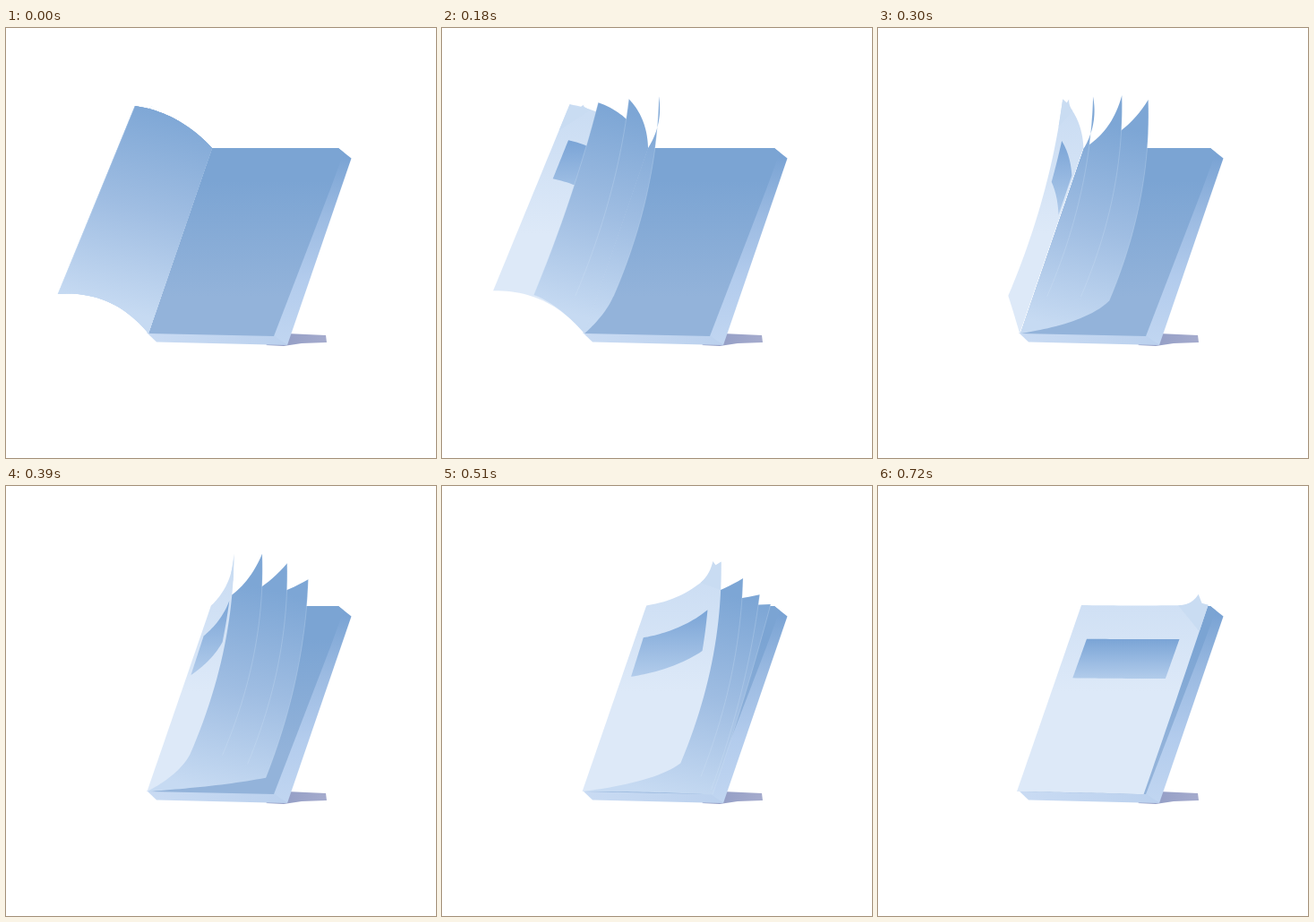
These frames come from a looping animation (480 px wide and 480 px high, 750 ms). An HTML page with a canvas:

```html
<!DOCTYPE html>
<html lang="en">
<head>
<meta charset="utf-8">
<title>Closing book</title>
<style>
html, body { margin: 0; width: 100%; height: 100%; overflow: hidden; background: #fff; }
canvas { display: block; width: 480px; height: 480px; }
</style>
</head>
<body>
<canvas id="stage" width="480" height="480"></canvas>
<script>
const ctx = document.getElementById('stage').getContext('2d');
const LOOP = 750, STEP = 30;
const TURN = 538, DELAY = 62, PAGES = 3;   // ms per sheet, ms between sheets

const clamp = (x, lo = 0, hi = 1) => Math.min(hi, Math.max(lo, x));
const mix = (a, b, t) => a + (b - a) * t;
const quad = (a, b, c, t) => mix(mix(a, b, t), mix(b, c, t), t);
const cubic = (a, b, c, d, t) => mix(quad(a, b, c, t), quad(b, c, d, t), t);
const smooth = (lo, hi, x) => {
  const t = clamp((x - lo) / (hi - lo));
  return t * t * (3 - 2 * t);
};

function gradient(x0, y0, x1, y1, ...colors) {
  const g = ctx.createLinearGradient(x0, y0, x1, y1);
  colors.forEach((c, i) => g.addColorStop(i / (colors.length - 1), c));
  return g;
}

function trace(points) {
  ctx.beginPath();
  points.forEach(p => ctx.lineTo(...p));
}

function fill(points, style) {
  trace(points);
  ctx.fillStyle = style;
  ctx.fill();
}

// Maps sheet coordinates (u from the spine, v from the top) to the stage.
// turn runs from 0 (open, left) to 1 (closed, right).
function sheet(turn, shift = 0, lift = 0) {
  const arch = Math.sin(Math.PI * turn);
  const drop = 47 * smooth(.46, .95, turn);
  const spineX = 230 - 3 * shift, spineY = 134 - shift, heelX = 159 - 4 * shift;
  const tipX = cubic(144, 240, 355, 370, turn) - shift - 3 * lift;
  const tipY = 87 - 12 * arch + drop - shift - 4 * lift;
  const footX = cubic(58, 203, 326, 299, turn) - 3 * shift - 2 * lift;
  const footY = 297 + 3 * arch + drop - 8 * lift;
  const topBendX = mix(193, 300, Math.sin(Math.PI / 2 * turn));
  const topBendY = mix(94, 134, smooth(0, .85, turn));
  const footBendX = mix(159, footX, .4 + .35 * arch);
  const footBendY = mix(292, 342, Math.sqrt(turn));
  return (u, v) => {
    const w = u - .5 * arch * u * (1 - u);
    const x0 = quad(spineX, topBendX, tipX, w), x1 = quad(heelX, footBendX, footX, w);
    const y0 = quad(spineY, topBendY, tipY, w), y1 = quad(341, footBendY, footY, w);
    return [mix(x0, x1, v) + 52 * arch * v * (1 - v) * w, mix(y0, y1, v)];
  };
}

function edge(at, u0, v0, u1, v1, n = 24) {
  return Array.from({ length: n + 1 }, (_, i) => at(mix(u0, u1, i / n), mix(v0, v1, i / n)));
}

function patch(at, u0, v0, u1, v1) {
  return [...edge(at, u0, v0, u1, v0), ...edge(at, u1, v0, u1, v1),
    ...edge(at, u1, v1, u0, v1), ...edge(at, u0, v1, u0, v0)];
}

function drawPage(phase) {
  if (phase >= TURN) return;
  const at = sheet(clamp(phase / TURN));
  fill(patch(at, 0, 0, 1, 1), gradient(210, 95, 155, 322, '#7da6d5', '#9fbde2', '#c6daf2'));
  trace(edge(at, 1, 0, 1, 1));
  ctx.strokeStyle = 'rgba(215,230,248,.25)';
  ctx.stroke();
}

function drawCover(phase) {
  const turn = clamp(phase / TURN);
  const at = sheet(turn, turn, Math.max(0, 1 - Math.abs(phase + 60) / 100));
  fill(patch(at, 0, 0, 1, 1), gradient(0, 100, 0, 230, '#cbddf3', '#dde9f8'));

  const label = patch(at, .135, .18, .865, .39), ys = label.map(p => p[1]);
  fill(label, gradient(0, Math.min(...ys), 0, Math.max(...ys), '#7aa4d6', '#b2cceb'));

  // Lifted paper corner
  const corner = at(1, 0), base = at(.76, 0), mid = at(.87, 0);
  const dx = clamp((204 - phase) / 13, -11, 20);
  const dy = -12 * smooth(.55, .95, turn);
  const tip = [corner[0] + dx, corner[1] + dy];
  const notch = [corner[0] + dx * .65, corner[1] + 4 + dy / 2];
  const curl = u => [0, 1].map(i => quad(base[i], mid[i], tip[i], u));
  fill([...edge(curl, 0, 0, 1, 0), notch, corner, at(1, .14)], '#c9dcf2');
}

function drawBase() {
  fill([[290, 354], [313, 341], [357, 343], [358, 351], [330, 352], [310, 355]],
    gradient(313, 0, 358, 0, '#959fc6', '#a5abcd'));
  fill([[371, 134], [385.5, 145.5], [314, 354], [297, 344]],
    gradient(0, 140, 0, 354, '#78a2d3', '#9cbbe2', '#b3cced', '#c1d6f1'));
  fill([[157, 340], [299, 343], [314, 354], [168, 350.5]],
    gradient(158, 0, 313, 0, '#c9dbf3', '#bbd1ee'));
  fill([[230, 134], [371, 134], [377, 139], [362, 180], [299, 344], [159, 341]],
    gradient(0, 170, 0, 300, '#7ba4d3', '#93b3da'));
}

function draw(now) {
  const time = Math.floor(now % LOOP / STEP) * STEP;
  ctx.clearRect(0, 0, 480, 480);
  drawBase();
  const leaves = Array.from({ length: PAGES + 1 }, (_, i) => ({
    phase: time - DELAY * i,
    paint: i < PAGES ? drawPage : drawCover
  }));
  // Each stack is painted from the bottom up
  const isLeft = leaf => leaf.phase < TURN / 3 - 5;
  const order = [...leaves.filter(isLeft).reverse(), ...leaves.filter(l => !isLeft(l))];
  order.forEach(leaf => leaf.paint(leaf.phase));
  requestAnimationFrame(() => draw(performance.now() - start));
}

const start = performance.now();
draw(0);
</script>
</body>
</html>
```
